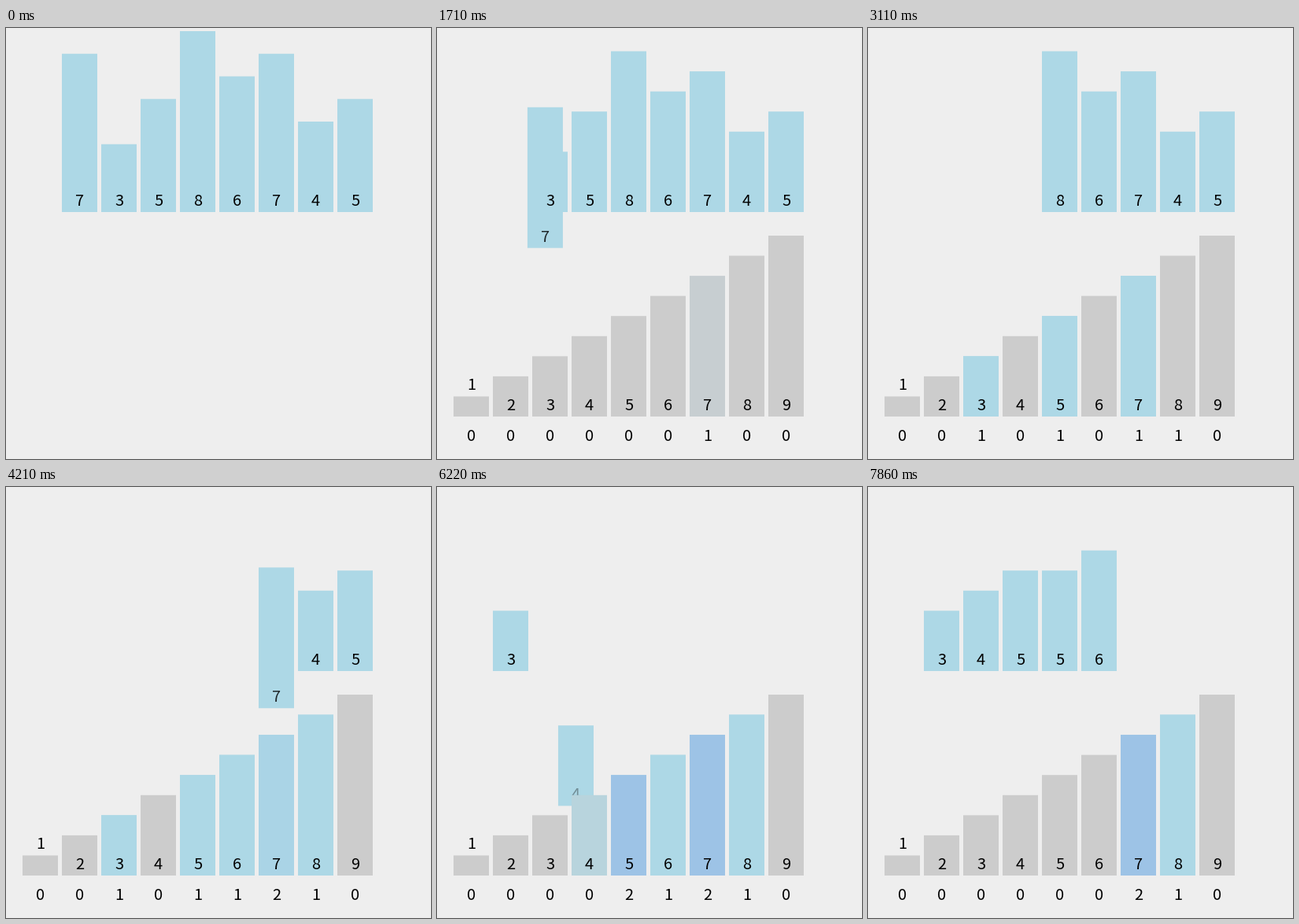
Write a matplotlib script that moves like this. It is 540x548 px and loops after 8000 ms.

```python
import numpy as np
import matplotlib.pyplot as plt
from matplotlib.animation import FuncAnimation
from matplotlib.patches import Rectangle

W, H = 540, 548
LOOP, TICK = 8000, 20
VALUES = [7, 3, 5, 8, 6, 7, 4, 5]
ORDER = sorted(range(8), key=lambda i: VALUES[i])
RISING = ORDER[:5]                # items taken back out before the loop ends
TOP, LOW = 234, 494               # baselines of the two rows
BAR, PITCH, TALL = 45, 50, 230
SHADES = np.array([(204, 204, 204), (173, 216, 230), (157, 195, 230)]) / 255
FIRST, GAP, MOVE = 1122, 499.8, 250
LEAD = 15                         # counters switch just before a move starts

fig = plt.figure(figsize=(W / 100, H / 100), dpi=100, facecolor="#eeeeee")
ax = fig.add_axes([0, 0, 1, 1])
ax.set_xlim(0, W)
ax.set_ylim(H, 0)
ax.axis("off")


def bar(x, y, h, color, z):
    return ax.add_patch(Rectangle((x, y), BAR, h, lw=0, fc=color,
                                  zorder=z, snap=False))


def label(x, y, s, z):
    return ax.text(x + BAR / 2, y, str(s), family="Noto Sans CJK JP",
                   size=20 * 0.72, ha="center", va="baseline",
                   color="black", zorder=z)


def slot(i):
    return 21 + PITCH * i


items = [(bar(0, 0, 0, SHADES[1], 2 * i), label(0, 0, v, 2 * i + 1))
         for i, v in enumerate(VALUES)]
bins = []
for n in range(1, 10):
    x, h = slot(n - 1), n * TALL / 9
    bins.append((bar(x, LOW - h, h, SHADES[0], 30),
                 label(x, LOW - 8 if h > 30 else LOW - h - 8, n, 31),
                 label(x, LOW + 31, 0, 31)))


def start(k):
    return FIRST + GAP * k


def progress(t, k):
    u = min(max((t - start(k)) / MOVE, 0), 1)
    return 4 * u ** 3 if u < 0.5 else 1 - 4 * (1 - u) ** 3


def place(i, fall, rise, unit):
    rect, text = items[i]
    v = VALUES[i]
    x, drop = slot(i + 1), (LOW - TOP) * (fall - rise)
    x += (slot(v - 1) - x) * fall
    x += (slot(ORDER.index(i) + 1) - x) * rise
    rect.set_bounds(x, TOP + drop - v * unit, BAR, v * unit)
    text.set_position((x + BAR / 2, TOP - 8 + drop))
    text.set_alpha(1 - fall + rise)


def shade(level):
    lo = min(int(level), 1)
    return SHADES[lo] + (SHADES[lo + 1] - SHADES[lo]) * (level - lo)


def draw(frame):
    t = frame * TICK + TICK // 2
    shown = progress(t, 0)
    unit = TALL / 8 + (TALL / 9 - TALL / 8) * shown
    level, count = np.zeros(10), np.zeros(10, int)

    for i, v in enumerate(VALUES):
        down, up = i + 1, 9 + ORDER.index(i)
        fall = progress(t, down)
        rise = progress(t, up) if i in RISING else 0
        level[v] += fall - rise
        count[v] += t >= start(down) - LEAD
        count[v] -= i in RISING and t >= start(up) - LEAD
        place(i, fall, rise, unit)

    for n, (rect, text, tally) in enumerate(bins, 1):
        rect.set_facecolor(shade(level[n]))
        tally.set_text(str(count[n]))
        for part in (rect, text, tally):
            part.set_alpha(shown)
    return []


anim = FuncAnimation(fig, draw, frames=LOOP // TICK, interval=TICK,
                     init_func=lambda: draw(0), repeat=True, repeat_delay=0,
                     blit=False, cache_frame_data=False)
plt.show()
```
